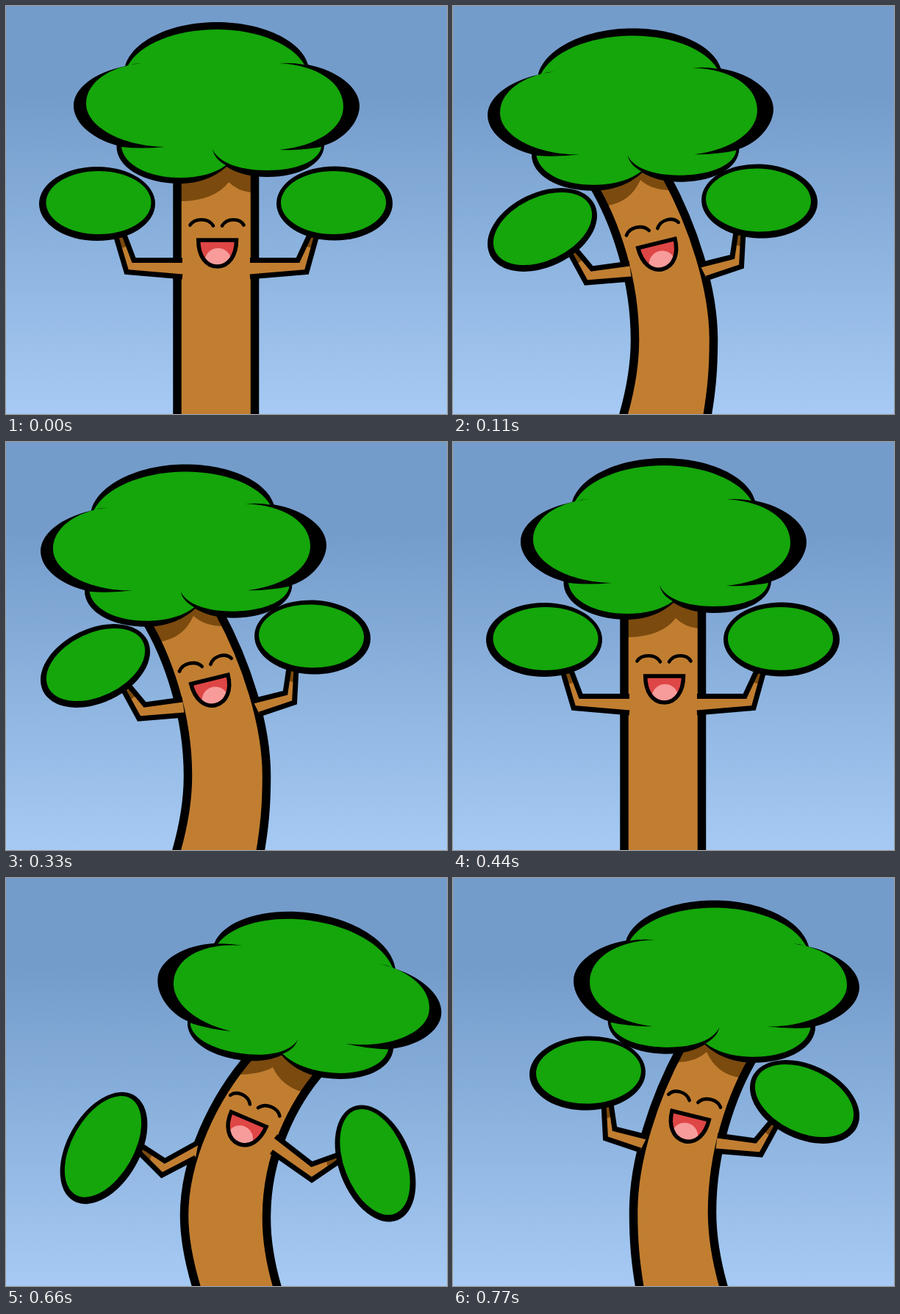
Write an HTML page with a canvas that moves like this. It is 600 by 556 pixels and loops after 0.88 s.

```html
<!DOCTYPE html>
<html lang="en">
<head>
<meta charset="utf-8">
<title>Dancing tree</title>
<style>
html, body { margin: 0; height: 100%; overflow: hidden; }
canvas { display: block; width: 100vw; height: 100vh; }
</style>
</head>
<body>
<canvas id="stage" width="600" height="556"></canvas>
<script>
const ctx = document.getElementById('stage').getContext('2d');
const GREEN = '#14a60a', BARK = '#c17e31', SHADE = '#7b4a0e';
const STEP_MS = 110;

const crownOutline = new Path2D(`M162 82C172 47 225 22 287 22C349 22 402 47 411 80
  C452 88 481 112 481 136C481 158 460 182 433 190C432 215 400 233 355 233
  C335 233 316 229 300 219C285 233 262 242 237 242C187 242 149 219 150.5 190
  C113 179 92 157 92 136C92 112 121 90 162 82Z`);
// Each spike of the leaf area tapers to a point where two lobes overlap.
const crownLeaves = new Path2D(`M166 81C182 52 230 32 287 32C344 32 391 53 406 80
  Q390 77 372 78C425 81 459 105 459 137C459 167 423 191 372 196Q404 197 429 192
  C426 211 396 224 355 224C315 224 288 212 281 195C283 205 290 212 299 217
  C285 228 262 234 237 234C193 234 160 216 157 192Q184 195 216 192
  C157 191 109 164 109 133C109 105 140 82 185 78Q175 78 166 81Z`);
const mouth = new Path2D('M261.7 319H313.5C313.5 340 303 355 287.5 355C271.5 355 261.7 340 261.7 319Z');
const eyes = new Path2D('M250.5 298.5C257 289 275 288.5 282 299.5M294 299.5C301 288.5 318 289 323.5 298.5');

// Upright, leaning, and bent fully to the left; right leans are mirrored.
// hands: [x, y, angle, rx, ry, leaf offset x, leaf offset y]
const poses = [
  {
    trunk: 'M233 180V570H338.5V180Z',
    shade: 'M150 266H239Q284 265 303 240Q315 252 333 254H400V150H150Z',
    arms: ['M240 369L164 362.5L149 312L161 312L174 346.5H240',
           'M332 369L409 362.5L423 312L413 312L397 346.5H332'],
    hands: [[124, 269.5, 0, 79, 50.5, 2, -1.5], [447, 269, 0, 79, 50.5, -1.5, -1]],
    crown: [0, 0, 0], face: [0, 0, 0]
  },
  {
    trunk: `M170 212L188 240C222 295 247.5 375 247.5 455C247.5 490 242 525 228 570
      H344C352 525 354.5 495 354.5 455C354.5 385 327 300 290 232L272 205Z`,
    shade: 'M150 272H209Q241 268 255 237Q270 251 297 251H400V150H150Z',
    arms: ['M243 372L181 377L157 333L164 328L189 358L240 351',
           'M345 371L392.5 355L395 308L385 308L380 342L336 353'],
    hands: [[121.5, 305, -25.6, 79, 50.5, .5, -1.5], [417, 266, 2, 79, 50.5, -1.5, -1.5]],
    crown: [-45, 8.5, -1.5], face: [-11.5, 4.5, -14]
  },
  {
    trunk: `M146 235L170 262C211 308 245 380 245.5 460C246 495 240 530 227 570
      H337C350 530 357.5 495 357.5 460C357.5 385 319 300 266 240L241 212Z`,
    shade: 'M120 291H199Q226 282 237 258Q254 268 288 268H400V150H120Z',
    arms: ['M239 373L184 411.5L142 383L142 375L184 390L233 352',
           'M342 381L388 405L424 369L420 362L384 385.5L338 360'],
    hands: [[97.5, 389, -69, 83, 49.5, .5, -2], [467, 368, 60.5, 83, 49.5, 1, -2]],
    crown: [-86, 25, -7.6], face: [-19, 10, -23]
  }
];
for (const pose of poses) {
  pose.trunk = new Path2D(pose.trunk);
  pose.shade = new Path2D(pose.shade);
  pose.arms = pose.arms.map(d => new Path2D(d));
}

const sky = ctx.createLinearGradient(0, 120, 0, 556);
sky.addColorStop(0, '#749ccb');
sky.addColorStop(1, '#a6caf3');

function fill(path, color) {
  ctx.fillStyle = color;
  ctx.fill(path);
}

function line(path, width) {
  ctx.lineWidth = width;
  ctx.stroke(path);
}

function scoped(draw) {
  ctx.save();
  draw();
  ctx.restore();
}

function shaded(shape, shadow) {
  fill(shape, BARK);
  scoped(() => { ctx.clip(shape); fill(shadow, SHADE); });
}

function moved([dx, dy, angle], cx, cy, draw) {
  scoped(() => {
    ctx.translate(cx + dx, cy + dy);
    ctx.rotate(angle * Math.PI / 180);
    ctx.translate(-cx, -cy);
    draw();
  });
}

function oval(x, y, rx, ry, angle = 0) {
  const path = new Path2D();
  path.ellipse(x, y, rx, ry, angle * Math.PI / 180, 0, 2 * Math.PI);
  return path;
}

function drawFace() {
  fill(mouth, '#df4646');
  scoped(() => { ctx.clip(mouth); fill(oval(288.5, 348, 18, 18), '#f89b9b'); });
  line(mouth, 5.5);
  ctx.lineCap = 'round';
  line(eyes, 4.6);
}

function drawTree(pose) {
  shaded(pose.trunk, pose.shade);
  line(pose.trunk, 11.5);
  pose.arms.forEach((arm, i) => {
    const [x, y, angle, rx, ry] = pose.hands[i];
    shaded(arm, oval(x, y, rx + 14, ry + 14, angle));
    line(arm, 7);
  });
  moved(pose.face, 288, 316, drawFace);
  moved(pose.crown, 286, 135, () => {
    fill(crownOutline, '#000');
    fill(crownLeaves, GREEN);
  });
  for (const [x, y, angle, rx, ry, dx, dy] of pose.hands) {
    fill(oval(x, y, rx, ry, angle), '#000');
    fill(oval(x + dx, y + dy, rx - 7.5, ry - 7.5, angle), GREEN);
  }
}

function frame() {
  const step = Math.floor(performance.now() / STEP_MS) % 8;
  ctx.fillStyle = sky;
  ctx.fillRect(0, 0, 600, 556);
  scoped(() => {
    if (step > 4) ctx.transform(-1, 0, 0, 1, 600, 0);
    drawTree(poses[[0, 1, 2, 1][step % 4]]);
  });
  requestAnimationFrame(frame);
}
frame();
</script>
</body>
</html>
```
